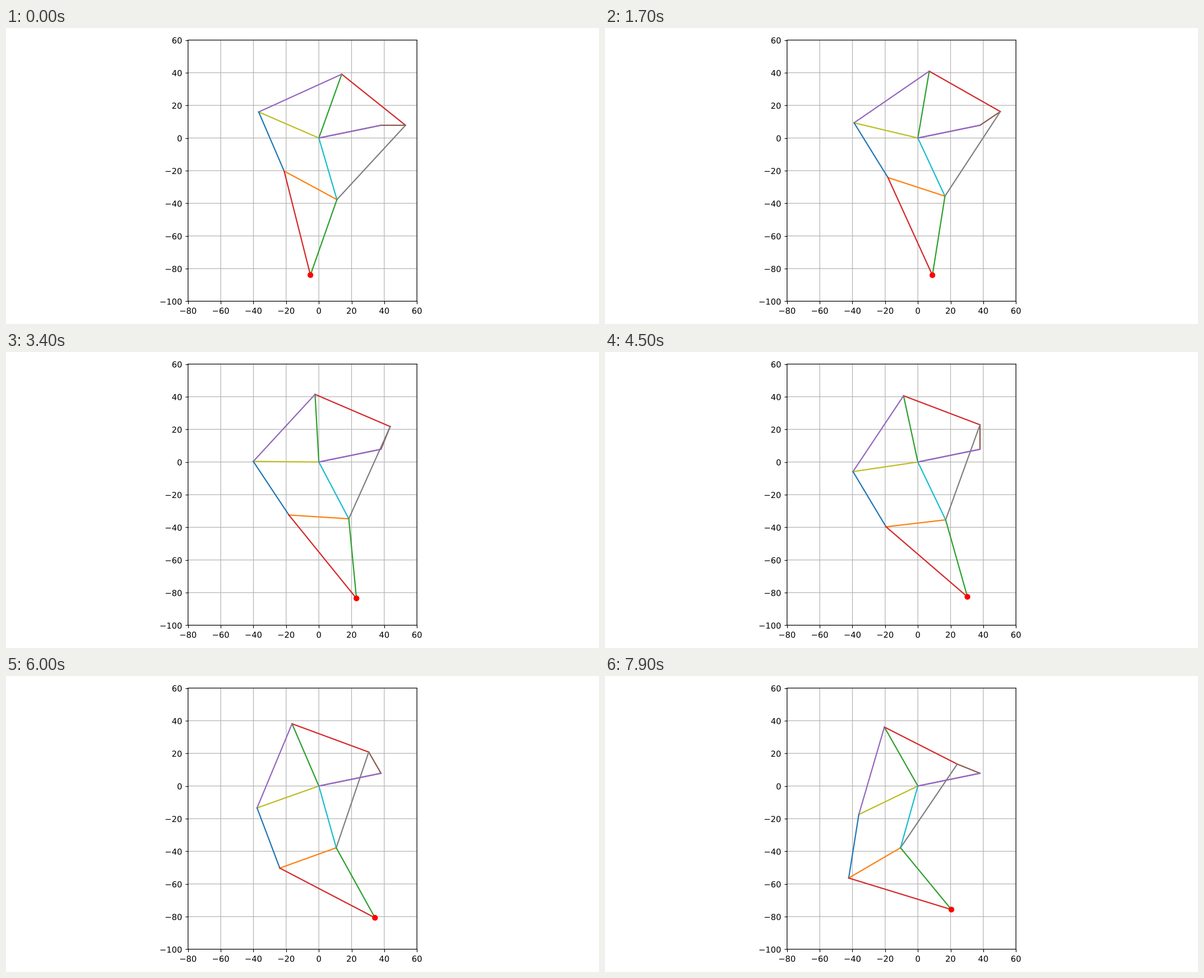
Recreate the animation shown at these times as a matplotlib script. Size 1058 by 529 pixels, loop 8000 ms.

```python
import numpy as np
import matplotlib.pyplot as plt
from matplotlib.animation import FuncAnimation
from matplotlib.patheffects import Normal

W, H, DPI = 1058, 529, 105.8
FRAMES, STEP = 80, 100
TOP, BOTTOM = 21.55, 40.65  # margins in pixels

# Link lengths of the walking leg
PIVOT = np.array([38, 7.8])
ORIGIN = np.zeros(2)
CRANK = 15
B, C, D, E, F = 41.5, 39.3, 40.1, 55.8, 39.4
G, HH, I, J, K = 36.7, 65.7, 49.0, 50.0, 61.9


def meet(p, rp, q, rq):
    """Point at distance rp from p and rq from q, on the left of p -> q."""
    d = np.hypot(*(q - p))
    u = (q - p) / d
    along = (rp**2 - rq**2 + d**2) / (2 * d)
    side = np.sqrt(rp**2 - along**2)
    return p + along * u + side * np.array([-u[1], u[0]])


def joints(angle):
    tip = PIVOT + CRANK * np.array([np.cos(angle), np.sin(angle)])
    top = meet(ORIGIN, B, tip, J)
    left = meet(ORIGIN, D, top, E)
    knee = meet(tip, K, ORIGIN, C)
    ankle = meet(knee, G, left, F)
    foot = meet(knee, I, ankle, HH)
    return dict(origin=ORIGIN, pivot=PIVOT, tip=tip, top=top, left=left,
                knee=knee, ankle=ankle, foot=foot)


LINKS = [
    ("origin", "pivot", "C4"),
    ("origin", "top", "C2"),
    ("top", "tip", "C3"),
    ("top", "left", "C4"),
    ("pivot", "tip", "C5"),
    ("tip", "knee", "C7"),
    ("origin", "left", "C8"),
    ("origin", "knee", "C9"),
    ("left", "ankle", "C0"),
    ("ankle", "knee", "C1"),
    ("knee", "foot", "C2"),
    ("ankle", "foot", "C3"),
    ("origin", "pivot", "C4"),
]

plt.rcParams["path.snap"] = False  # keep sub-pixel positions

fig = plt.figure(figsize=(W / DPI, H / DPI), dpi=DPI)
height = H - TOP - BOTTOM
scale = height / 160
width = 140 * scale
ax = fig.add_axes([(1 - width / W) / 2, BOTTOM / H, width / W, height / H])
ax.set_xlim(-80, 60)
ax.set_ylim(-100, 60)
ax.grid()
for label in ax.get_xticklabels() + ax.get_yticklabels():
    label.set_path_effects([Normal()])  # smooth, unhinted glyphs

bars = [ax.plot([], [], color=color)[0] for _, _, color in LINKS]
dot = ax.add_patch(plt.Circle((0, 0), 3.5 * DPI / 72 / scale, color="red",
                              lw=0, zorder=3))


def update(i):
    pts = joints(np.radians(2 * i))
    for bar, (start, end, _) in zip(bars, LINKS):
        bar.set_data(*zip(pts[start], pts[end]))
    dot.center = pts["foot"]
    return bars + [dot]


anim = FuncAnimation(fig, update, frames=FRAMES, interval=STEP, repeat=True,
                     repeat_delay=0, init_func=lambda: update(0))
plt.show()
```
